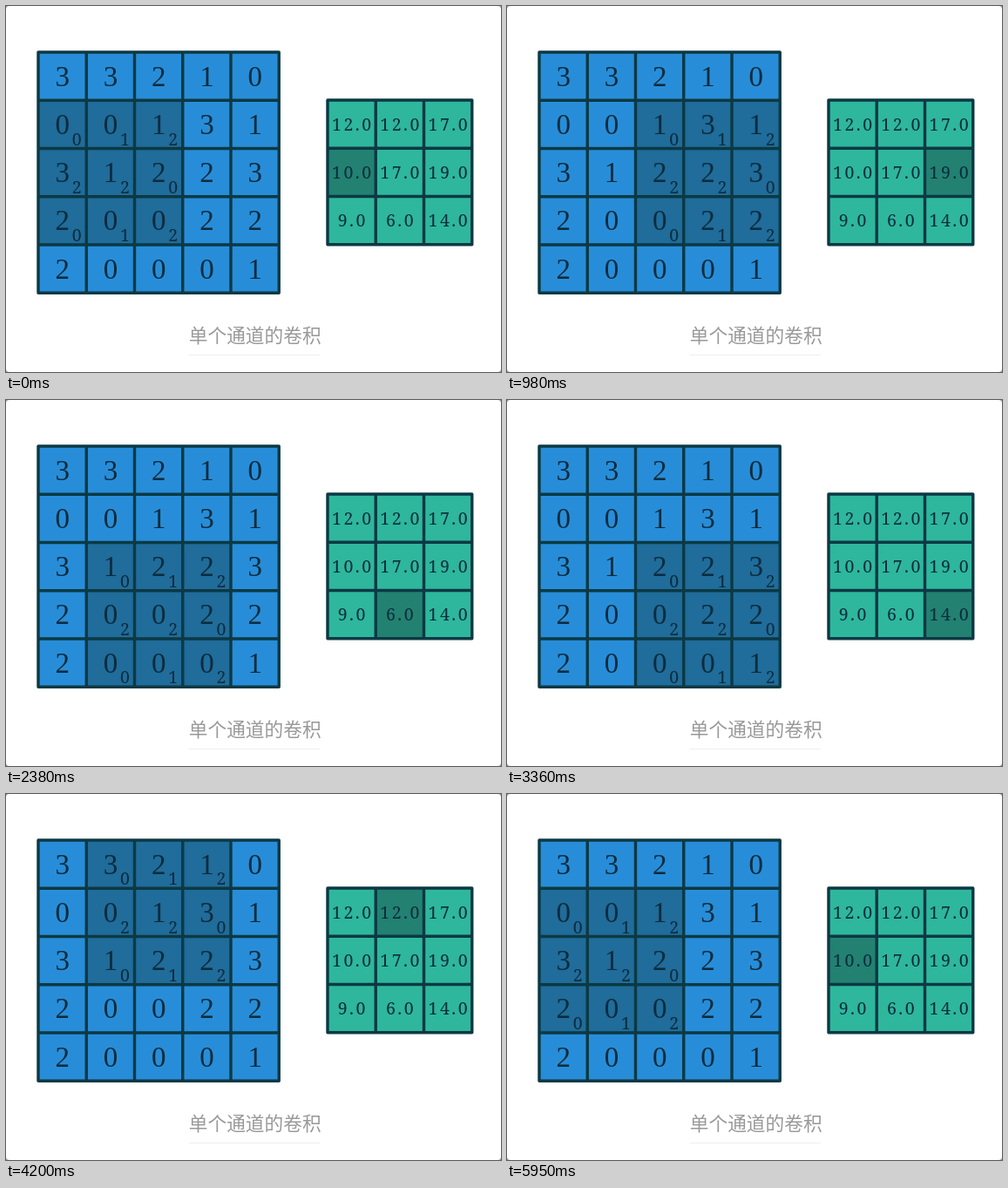
These frames come from a looping animation (568x420 px, 6020 ms). An HTML page:

```html
<!DOCTYPE html>
<html lang="zh">
<head>
<meta charset="utf-8">
<style>
  html, body { margin: 0; width: 100%; height: 100%; overflow: hidden; background: #8e999b; }
  svg { display: block; width: 568px; height: 420px; }
  text { text-anchor: middle; fill: #0b2c3e; }
  .input text { font: 33px "Liberation Serif", serif; }
  .output text { font: 19.5px "Noto Serif", serif; letter-spacing: 2.5px; }
  .kernel text { font: 19.5px "Noto Serif", serif; }
  .lines { fill: none; stroke: #0b3944; stroke-width: 3.4; stroke-linejoin: round; stroke-linecap: round; }
  .caption { font: 21.7px "Noto Sans CJK SC", "Noto Sans CJK", sans-serif; fill: #999; }
</style>
</head>
<body>
<svg id="stage" viewBox="0 0 568 420">
  <rect width="568" height="420" rx="4" fill="#fff"/>
  <text class="caption" x="285.7" y="386">单个通道的卷积</text>
  <path d="M210 400.5H360" stroke="#eee"/>
</svg>
<script>
const CELL = 55.25, LOOP = 6020, TICK = 70, TICKS_PER_STEP = LOOP / TICK / 9;
const input = ['33210', '00131', '31223', '20022', '20001'].map(row => [...row]);
const kernel = ['012', '220', '012'].map(row => [...row]);
const output = [['12.0', '12.0', '17.0'], ['10.0', '17.0', '19.0'], ['9.0', '6.0', '14.0']];
const stage = document.getElementById('stage');

function add(parent, tag, attrs, content = '') {
  const node = document.createElementNS('http://www.w3.org/2000/svg', tag);
  for (const name in attrs) node.setAttribute(name, attrs[name]);
  node.textContent = content;
  return parent.appendChild(node);
}

function addLabels(parent, values, dx, dy) {
  values.forEach((row, r) => row.forEach((value, c) =>
    add(parent, 'text', { x: (c + 0.5) * CELL + dx, y: (r + 0.5) * CELL + dy }, value)));
}

// Builds a labelled grid and returns its movable highlight square.
function addGrid(name, x, y, values, fill, shade, shadeCells, dx, dy) {
  const count = values.length, size = count * CELL;
  const group = add(stage, 'g', { class: name, transform: `translate(${x} ${y})` });
  add(group, 'rect', { width: size, height: size, fill });
  const highlight = add(group, 'g', {});
  add(highlight, 'rect', { width: shadeCells * CELL, height: shadeCells * CELL, fill: shade });
  let d = '';
  for (let i = 0; i <= count; i++) d += `M0 ${i * CELL}H${size}M${i * CELL} 0V${size}`;
  add(group, 'path', { d, class: 'lines' });
  addLabels(group, values, dx, dy);
  return highlight;
}

const inputShade = addGrid('input', 37, 53, input, '#288dd8', '#206c9a', 3, 0, 11);
const outputShade = addGrid('output', 369, 108, output, '#2eb79c', '#238171', 1, 1.2, 7.3);
const weights = add(stage, 'g', { class: 'kernel' });
addLabels(weights, kernel, 53.6, 76.8);

function draw(now) {
  const tick = Math.floor((now % LOOP) / TICK);
  const step = Math.floor((tick + 8.166) / TICKS_PER_STEP);
  const row = (Math.floor(step / 3) + 1) % 3, col = step % 3;
  const move = `translate(${col * CELL} ${row * CELL})`;
  for (const node of [inputShade, outputShade, weights]) node.setAttribute('transform', move);
  requestAnimationFrame(() => draw(performance.now()));
}
draw(performance.now());
</script>
</body>
</html>
```
